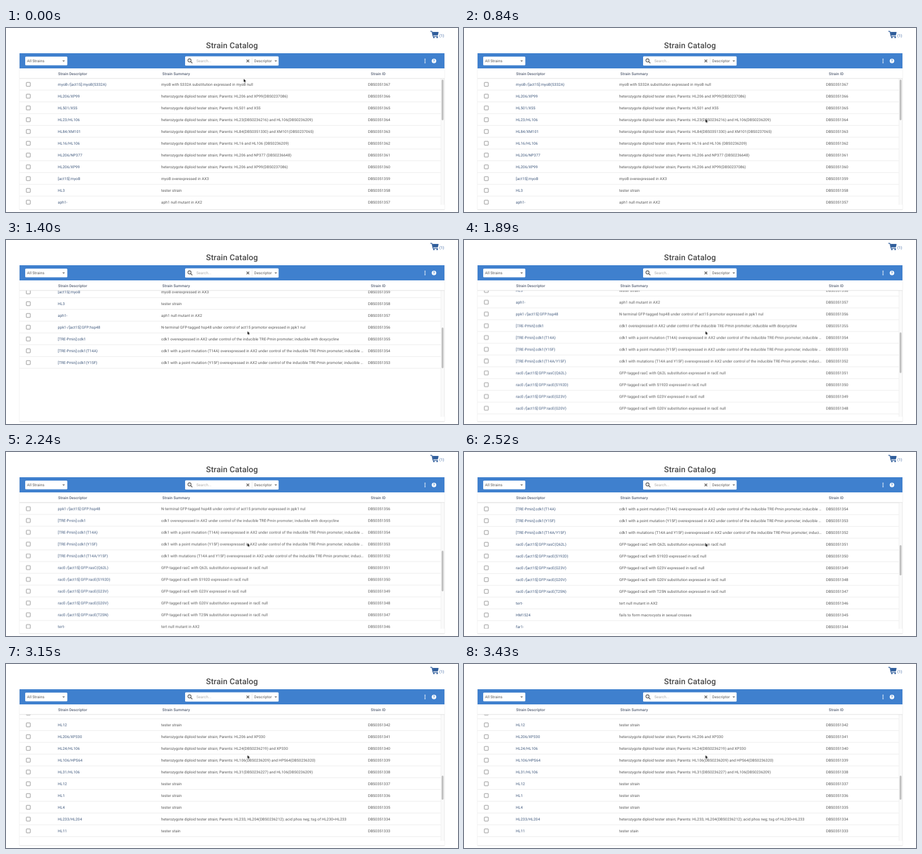
An HTML page that plays this animation: 800 px wide and 328 px high, repeating every 3500 ms.

```html
<!DOCTYPE html>
<html lang="en">
<head>
<meta charset="utf-8">
<title>Strain Catalog</title>
<style>
  html, body { margin: 0; width: 100%; height: 100%; overflow: hidden; background: #fff; }
  svg { display: block; width: 800px; height: 328px; }
  text {
    font: 400 6.67px Roboto, "Open Sans", sans-serif;
    letter-spacing: .0107em;
    text-rendering: geometricPrecision;
    fill: #555;
  }
  .title { font-size: 14.3px; font-weight: 500; letter-spacing: .0075em; fill: #4a4a4a; }
  .head text { font-weight: 500; fill: #566074; }
  .name { fill: #3f587c; }
  .hint { fill: #aaa; }
  .box { fill: none; stroke: #757575; stroke-width: .8; }
  .rule { stroke: #e4e4e4; stroke-width: .7; }
</style>
</head>
<body>
<svg viewBox="0 0 800 328">
  <defs>
    <clipPath id="view"><rect x="24" y="90.3" width="752" height="224.7"/></clipPath>
    <path id="arrow" d="M-2.4-1.2h4.8L0 1.2z" fill="#757575"/>
  </defs>

  <!-- cart -->
  <g fill="none" stroke="#2f5d9b" stroke-linejoin="round" stroke-linecap="round">
    <path d="M751.4 5.8h2.4l2 9.1h8.2" stroke-width="1.3"/>
    <path d="M755.2 7.6h10l-1.2 5h-7.8z" fill="#2f5d9b"/>
    <circle cx="757.2" cy="16.9" r=".9" fill="#2f5d9b"/>
    <circle cx="763" cy="16.9" r=".9" fill="#2f5d9b"/>
  </g>
  <text x="767" y="16.4" style="fill:#3f67a3">(1)</text>

  <text class="title" x="400" y="36.2" text-anchor="middle">Strain Catalog</text>

  <!-- paper -->
  <rect x="23.7" y="45" width="752.6" height="279.2" fill="#d8d8d8"/>
  <rect x="24" y="45" width="752" height="278.4" fill="#fff"/>

  <!-- toolbar -->
  <rect x="24" y="45" width="752" height="27" fill="#3f80ce"/>
  <rect x="34" y="51" width="74.5" height="15.5" rx="1.5" fill="#fff"/>
  <text x="37.3" y="61">All Strains</text>
  <use href="#arrow" x="102" y="59"/>
  <rect x="317" y="50.5" width="165.5" height="16.5" rx="1.5" fill="#fff"/>
  <g fill="none" stroke="#666">
    <circle cx="324.8" cy="57.8" r="2.8" stroke-width="1.3"/>
    <path d="M327 60l2.3 2.3" stroke-width="1.6" stroke-linecap="round"/>
    <path d="M425.8 56.4l4.6 4.6m0-4.6l-4.6 4.6" stroke-width="1.4"/>
    <path d="M435.5 51v15.5" stroke="#ddd" stroke-width=".6"/>
  </g>
  <text class="hint" x="337" y="61">Search...</text>
  <text x="439.3" y="61">Descriptor</text>
  <use href="#arrow" x="477.5" y="59"/>
  <g fill="#fff">
    <circle cx="741.6" cy="55.7" r="1"/>
    <circle cx="741.6" cy="58.7" r="1"/>
    <circle cx="741.6" cy="61.7" r="1"/>
    <circle cx="757.5" cy="58.7" r="4"/>
  </g>
  <text x="757.5" y="61.1" text-anchor="middle" style="font-weight:700;fill:#3f80ce">?</text>

  <!-- table -->
  <g class="head">
    <text x="92.3" y="83.6">Strain Descriptor</text>
    <text x="276.8" y="83.6">Strain Summary</text>
    <text x="645.8" y="83.6">Strain ID</text>
  </g>
  <g clip-path="url(#view)">
    <g id="list"><g id="late"></g></g>
    <rect x="769.6" y="90" width="6.1" height="225" fill="#fafafa"/>
    <path d="M769.8 90v225M775.5 90v225" stroke="#e6e6e6" stroke-width=".5"/>
    <rect id="thumb" x="771" y="92" width="3.4" height="72.5" rx="1.7" fill="#c1c1c1"/>
  </g>
  <path d="M24 90h752" stroke="#d9d9d9" stroke-width=".8"/>

  <path id="cursor" d="M0 0v5.6l1.3-1.2.9 2 1-.4-.9-2h1.8z"
    fill="#111" stroke="#fff" stroke-width=".5" paint-order="stroke"/>
</svg>

<script>
const LOOP = 3500, ROW = 21, FIRST_ID = 351367, EARLY_ROWS = 15;
const $ = id => document.getElementById(id);

const cross = "heterozygote diploid tester strain; Parents: ";
const promoter = " overexpressed in AX2 under control of the inducible TRE-Pmin promoter; ";
const race = (gene, mutation, note) =>
  [`racE-/[act15]:GFP:${gene}(${mutation})`, `GFP-tagged ${gene} with ${mutation} ${note}expressed in racE null`];

const strains = [
  ["myoB-/[act15]:myoB(S332A)", "myoB with S332A substitution expressed in myoB null"],
  ["HL206/XP99", cross + "HL206 and XP99(DBS0237086)"],
  ["HL501/X55", cross + "HL501 and X55"],
  ["HL23/HL106", cross + "HL23(DBS0236216) and HL106(DBS0236209)"],
  ["HL84/XM101", cross + "HL84(DBS0351330) and XM101(DBS0237065)"],
  ["HL16/HL106", cross + "HL16 and HL106 (DBS0236209)"],
  ["HL206/NP377", cross + "HL206 and NP377 (DBS0236648)"],
  ["HL206/XP99", cross + "HL206 and XP99(DBS0237086)"],
  ["[act15]:myoB", "myoB overexpressed in AX3"],
  ["HL3", "tester strain"],
  ["aph1-", "aph1 null mutant in AX2"],
  ["ppk1-/[act15]:GFP:hsp48", "N-terminal GFP-tagged hsp48 under control of act15 promotor expressed in ppk1 nul"],
  ["[TRE-Pmin]:cdk1", "cdk1" + promoter.replace("the ", "the ") + "inducible with doxycycline"],
  ["[TRE-Pmin]:cdk1(T14A)", "cdk1 with a point mutation (T14A)" + promoter + "inducible …"],
  ["[TRE-Pmin]:cdk1(Y15F)", "cdk1 with a point mutation (Y15F)" + promoter + "inducible …"],
  ["[TRE-Pmin]:cdk1(T14A/Y15F)", "cdk1 with mutations (T14A and Y15F)" + promoter + "induci…"],
  race("rasC", "Q62L", "substitution "),
  race("racE", "S192D", ""),
  race("racE", "G23V", ""),
  race("racE", "G20V", "substitution "),
  race("racE", "T25N", "substitution "),
  ["tert-", "tert null mutant in AX2"],
  ["HM1524", "fails to form macrocysts in sexual crosses"],
  ["far1-", ""],
  ["HL12", "tester strain", 351342],
  ["HL206/XP330", cross + "HL206 and XP330"],
  ["HL24/HL106", cross + "HL24(DBS0236219) and XP330"],
  ["HL106/HPS64", cross + "HL106(DBS0236209) and HPS64(DBS0236320)"],
  ["HL31/HL106", cross + "HL31(DBS0236227) and HL106(DBS0236209)"],
  ["HL12", "tester strain"],
  ["HL1", "tester strain"],
  ["HL4", "tester strain"],
  ["HL233/HL204", cross + "HL233, HL204(DBS0236212); acid phos neg; tsg of HL230=HL233"],
  ["HL11", "tester stain"]
];

function add(parent, tag, attrs, text = "") {
  const el = document.createElementNS("http://www.w3.org/2000/svg", tag);
  for (const key in attrs) el.setAttribute(key, attrs[key]);
  el.textContent = text;
  parent.append(el);
}

let id = FIRST_ID + 1;
strains.forEach(([name, summary, ownId], i) => {
  const parent = i < EARLY_ROWS ? $("list") : $("late");
  const top = 90 + i * ROW, y = top + 12.8;
  id = ownId || id - 1;
  add(parent, "rect", { class: "box", x: 36, y: top + 7, width: 7, height: 7, rx: .7 });
  add(parent, "text", { class: "name", x: 91.8, y }, name);
  add(parent, "text", { x: 274.7, y }, summary);
  add(parent, "text", { x: 640.7, y }, "DBS0" + id);
  add(parent, "line", { class: "rule", x1: 24, x2: 769.6, y1: top + 20.7, y2: top + 20.7 });
});

// Holds each [time, value] until the next one.
function hold(el, steps, style) {
  const frames = steps.map(([t, ...v]) => ({ offset: t / LOOP, easing: "steps(1, end)", ...style(...v, t) }));
  frames.push({ ...frames.at(-1), offset: 1 });
  el.animate(frames, { duration: LOOP, iterations: Infinity });
}
const move = (x, y) => ({ transform: `translate(${x}px, ${y}px)` });

const scroll = [
  [0, 0], [980, 6], [1050, 32], [1190, 89], [1330, 155], [1400, 176], [1540, 184],
  [1820, 190], [1890, 199.6], [2030, 219], [2240, 230.4], [2380, 244], [2520, 272],
  [2590, 284], [2730, 294], [2800, 301], [2940, 405], [3150, 496]
];

// The thumb shrinks each time more rows are fetched: [start, travel per pixel, height].
const pages = [[0, .364, 72.5], [2520, .272, 54], [2940, .2157, 43]];
const pageAt = t => pages.findLast(p => t >= p[0]);

hold($("list"), scroll, y => move(0, -y));
hold($("thumb"), scroll, (y, t) => {
  const [, ratio, height] = pageAt(t);
  return { ...move(0, y * ratio), height: height + "px" };
});
hold($("late"), [[0, 0], [1540, 1]], opacity => ({ opacity }));
hold($("cursor"), [[0, 420.7, 90.7], [140, 424, 134], [280, 425, 138], [350, 425.5, 140],
  [490, 427, 158], [630, 427.4, 162], [700, 427.4, 162.7]], move);
</script>
</body>
</html>
```
